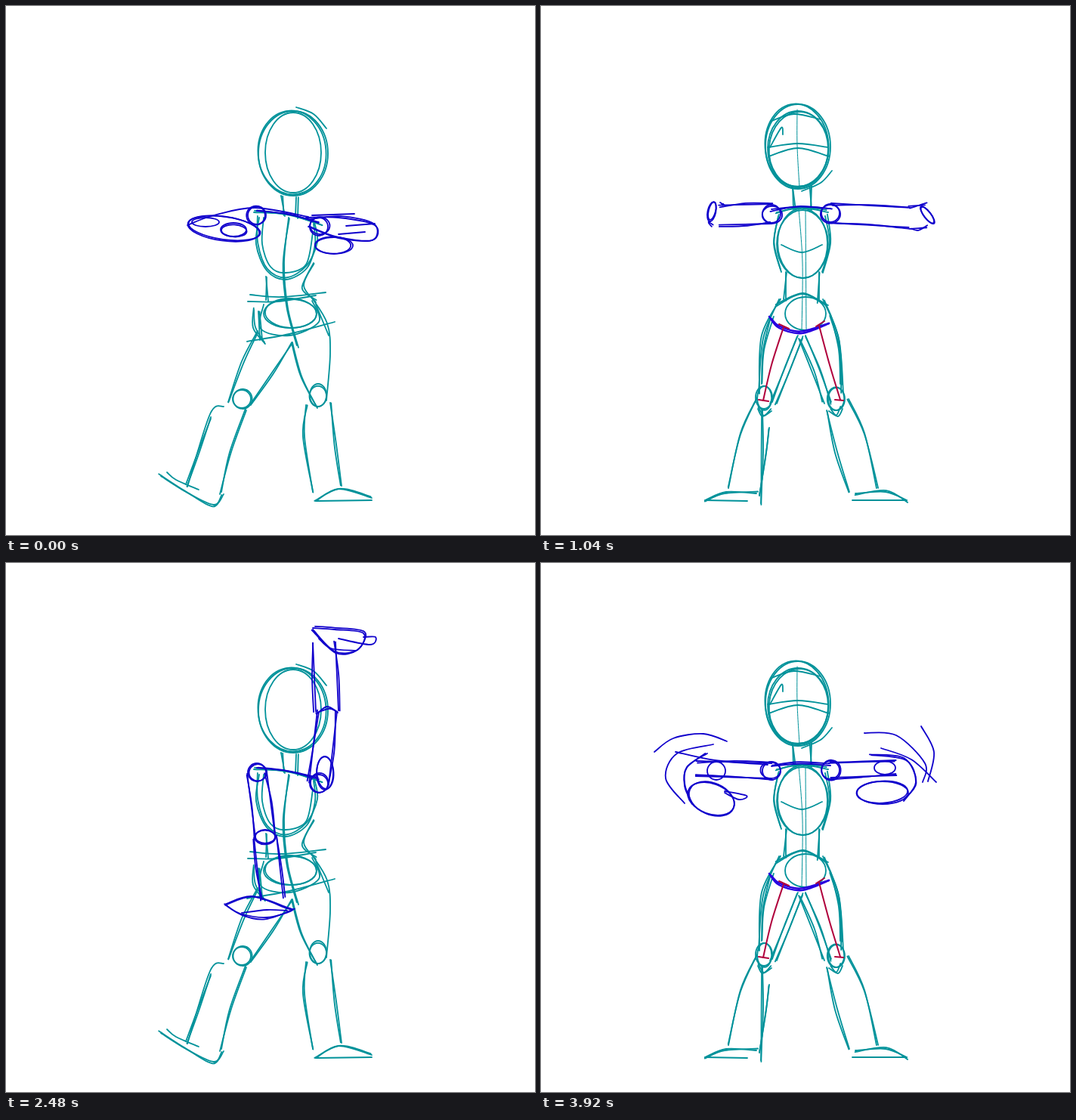
These frames come from a looping animation (700 by 700 pixels, 4 s). An HTML page with a canvas:

```html
<!DOCTYPE html>
<html lang="en">
<head>
<meta charset="utf-8">
<title>Dance sketch</title>
<style>
html, body { margin: 0; width: 100%; height: 100%; overflow: hidden; background: #fff; }
canvas { display: block; }
</style>
</head>
<body>
<canvas id="stage" width="700" height="700"></canvas>
<script>
const ctx = document.getElementById('stage').getContext('2d');
const TEAL = '#00929a', BLUE = '#1000cc', RED = '#b0003c';
const STEP = 80, COUNT = 50;

let seed = 1;
const shake = size => {
  seed = seed * 16807 % 2147483647;
  return (seed / 2147483647 - 0.5) * 2 * size;
};

function pen(color, width = 1.8) {
  ctx.strokeStyle = color;
  ctx.lineWidth = width;
}

// Smooth stroke through points x y x y ...
function line(...p) {
  const n = p.length / 2;
  const at = (i, d) => p[2 * Math.max(0, Math.min(n - 1, i)) + d];
  ctx.beginPath();
  ctx.moveTo(p[0], p[1]);
  for (let i = 0; i < n - 1; i++) {
    const c = [];
    for (const d of [0, 1]) {
      c[d] = at(i, d) + (at(i + 1, d) - at(i - 1, d)) / 6;
      c[d + 2] = at(i + 1, d) - (at(i + 2, d) - at(i, d)) / 6;
      c[d + 4] = at(i + 1, d);
    }
    ctx.bezierCurveTo(...c);
  }
  ctx.stroke();
}

// The same stroke gone over a second time by a loose hand
function loose(...p) {
  line(...p);
  line(...p.map(v => v + shake(3)));
}

function oval(x, y, rx, ry, turn = 0) {
  ctx.beginPath();
  ctx.ellipse(x, y, rx, ry, turn * Math.PI / 180, 0, 2 * Math.PI);
  ctx.stroke();
}

function ring(x, y, rx, ry = rx, turn = 0) {
  oval(x, y, rx, ry, turn);
  oval(x + shake(1.5), y + shake(1.5), rx + shake(1.5), ry + shake(1.5), turn + shake(4));
}

// A stroke and its mirror image; axis is twice the centre line
function both(axis, ...p) {
  loose(...p);
  loose(...p.map((v, i) => i % 2 ? v : axis - v));
}

function leanBody() {
  pen(TEAL);
  ring(380, 195, 46, 56);
  oval(380, 194, 37, 53);
  line(384, 134, 407, 143, 424, 162);
  loose(364, 251, 369, 278);
  loose(384, 253, 383, 278);
  loose(328, 273, 375, 276, 418, 290);
  loose(335, 280, 331, 315, 345, 350, 370, 362, 398, 347, 409, 315, 407, 288);
  line(341, 280, 339, 315, 350, 345, 370, 353, 397, 342, 406, 300);
  loose(374, 280, 368, 340, 373, 400, 387, 452);
  // pelvis
  loose(344, 358, 347, 391);
  loose(407, 340, 394, 370, 410, 392);
  line(323, 382, 365, 385, 423, 379);
  line(320, 391, 360, 391, 410, 383);
  ring(376, 407, 35, 19);
  line(341, 395, 337, 427, 375, 436, 414, 418, 405, 390);
  line(319, 444, 375, 434, 435, 418);
  loose(328, 402, 330, 425, 342, 445);
  loose(334, 404, 336, 442);
  // legs
  loose(333, 430, 312, 470, 294, 524);
  loose(379, 446, 352, 485, 324, 526);
  loose(378, 446, 390, 490, 412, 532);
  line(404, 385, 425, 420, 429, 460, 424, 522);
  line(410, 395, 427, 436);
  ring(312, 520, 12);
  ring(413, 515, 11, 15);
  line(288, 530, 270, 540, 240, 636);
  loose(271, 546, 254, 590, 238, 633);
  loose(318, 535, 298, 590, 283, 646);
  loose(397, 528, 395, 570, 406, 643);
  loose(429, 525, 437, 580, 444, 635);
  // feet
  loose(205, 622, 240, 644, 275, 660, 288, 646);
  line(213, 617, 225, 627, 255, 640);
  loose(410, 655, 440, 639, 484, 651);
  line(410, 655, 484, 654);
}

function squareBody() {
  pen(TEAL);
  ring(340, 186, 43, 56);
  ring(340, 189, 40, 50);
  line(300, 187, 340, 182, 380, 187);
  line(301, 199, 340, 188, 381, 199);
  line(303, 187, 318, 161, 320, 170);
  line(305, 152, 335, 143, 370, 150);
  line(385, 218, 370, 234, 345, 245);
  both(691, 333, 238, 334, 269);
  ring(346, 315, 34, 45);
  both(690, 314, 278, 308, 315, 318, 352);
  loose(312, 273, 345, 267, 380, 273);
  line(318, 316, 345, 326, 372, 316);
  both(692, 324, 352, 324, 390);
  loose(310, 398, 345, 381, 380, 396);
  oval(350, 407, 27, 22);
  // legs
  both(688, 315, 388, 294, 440, 288, 512);
  both(688, 305, 408, 294, 455, 292, 500);
  both(690, 340, 436, 322, 480, 306, 524);
  both(687, 346, 440, 328, 485, 312, 526);
  ring(295, 518, 11, 15);
  ring(391, 520, 11, 15);
  both(686, 287, 533, 293, 543, 305, 536);
  both(692, 285, 520, 264, 565, 248, 638);
  loose(293, 535, 294, 590, 291, 658);
  loose(302, 558, 298, 590, 289, 648);
  loose(378, 535, 392, 590, 408, 643);
  both(701, 217, 654, 245, 643, 285, 645);
  line(217, 654, 273, 655);
  line(412, 654, 484, 654);
  pen(TEAL, 1);
  line(339, 137, 339, 185, 342, 240);
  line(341, 268, 346, 340, 345, 430);
  line(350, 270, 351, 430);
  pen('#2800e0', 2.5);
  loose(302, 411, 315, 426, 345, 433, 381, 420);
  pen(RED, 2);
  line(321, 425, 305, 475, 294, 522);
  line(368, 423, 382, 475, 396, 521);
  line(315, 421, 328, 427);
  line(288, 521, 301, 523);
  line(364, 424, 375, 417);
  line(389, 521, 400, 522);
}

// Arms as elbow, wrist, fingertip (left, then right); tubes is how many limb segments
// the finished drawing shows, hands adds its own details.
const pose = (left, right, tubes, hands) => ({ joints: [...left, ...right], tubes, hands });

// Arms thrown out straight to the given fingertips
function straight(lx, ly, rx, ry) {
  const reach = (x, y, sx) => [0.42, 0.78, 1].flatMap(k => [sx + (x - sx) * k, 280 + (y - 280) * k]);
  return pose(reach(lx, ly, 308), reach(rx, ry, 396), 2);
}

const fold = pose([246, 290, 305, 297, 335, 303], [486, 300, 450, 314, 410, 318], 0, () => {
  ring(289, 294, 48, 15, 8);
  ring(301, 296, 17, 9);
  line(240, 290, 275, 277, 330, 267, 400, 279);
  oval(264, 286, 18, 6);
  loose(397, 280, 440, 280, 488, 290, 485, 310, 440, 307, 400, 292);
  line(405, 277, 461, 275);
  ring(434, 317, 25, 11);
  line(450, 291, 488, 288);
  line(440, 302, 475, 299);
});

const raise = pose([212, 266, 192, 187, 237, 132], [449, 238, 436, 147, 380, 106], 2, () => {
  loose(171, 187, 185, 157, 215, 131, 236, 130, 230, 147, 213, 166);
  line(213, 166, 238, 155);
  line(175, 187, 207, 184, 239, 162);
  line(220, 249, 211, 262, 209, 280);
  loose(383, 103, 405, 103, 430, 113, 448, 138, 458, 175);
  line(375, 113, 395, 127, 437, 140);
  loose(379, 145, 390, 137, 421, 148);
  line(421, 150, 430, 140, 445, 145, 452, 157);
});

const fling = pose([222, 304, 205, 330, 243, 345], [443, 254, 478, 278, 450, 298], 1, () => {
  line(215, 297, 229, 278, 226, 308, 215, 297);
  loose(198, 292, 193, 315, 205, 345, 238, 354, 249, 335, 230, 308);
  line(188, 290, 185, 318, 197, 342);
  line(178, 277, 141, 315, 155, 342, 220, 357);
  line(198, 288, 171, 313, 195, 345);
  oval(449, 254, 12, 12);
  loose(440, 240, 468, 243, 482, 272, 465, 301, 444, 286, 455, 250);
  line(484, 204, 490, 235, 480, 295);
  line(504, 212, 531, 238, 517, 273, 480, 295);
  line(500, 220, 512, 250, 487, 292);
  line(494, 222, 495, 250, 487, 275);
});

const leftUp = pose([308, 203, 325, 113, 350, 62], [411, 370, 388, 446, 375, 475], 2, () => {
  loose(312, 107, 328, 68, 347, 58, 367, 78, 366, 95);
  line(335, 90, 352, 97, 378, 94, 357, 113, 339, 118);
  line(310, 108, 322, 102, 335, 108, 340, 118);
  line(292, 205, 300, 201, 313, 202);
  loose(402, 363, 411, 362, 420, 377);
  loose(372, 440, 366, 465, 382, 478, 403, 455);
  line(382, 445, 395, 455, 408, 450, 415, 473, 405, 445);
  oval(384, 466, 8, 8);
});

const rightUp = pose([343, 362, 352, 445, 295, 453], [425, 196, 421, 105, 485, 100], 2, () => {
  ring(343, 362, 13, 9);
  loose(291, 451, 325, 441, 370, 455, 378, 460, 345, 469, 310, 464, 291, 453);
  line(312, 463, 345, 459, 372, 460);
  ring(422, 278, 11, 22);
  loose(411, 200, 425, 190, 439, 198);
  loose(406, 86, 435, 88, 473, 93, 465, 115, 435, 117, 406, 88);
  line(414, 100, 430, 113, 463, 116);
  line(473, 98, 489, 98, 482, 108, 440, 100);
});

const onHip = pose([269, 236, 256, 150, 315, 135], [455, 336, 425, 392, 420, 435], 2, () => {
  ring(269, 236, 13);
  ring(283, 139, 34, 11, -8);
  loose(238, 153, 247, 137, 280, 128, 321, 130);
  oval(448, 333, 9, 9);
  ring(417, 407, 16, 31, -15);
  line(462, 332, 440, 348, 408, 333);
  line(480, 292, 478, 310, 462, 335);
});

const swing = pose([205, 272, 202, 302, 252, 322], [470, 271, 485, 300, 420, 305], 1, () => {
  oval(232, 275, 12, 12);
  ring(225, 312, 32, 20, 20);
  line(243, 302, 272, 308, 262, 313, 243, 304);
  line(150, 250, 175, 232, 215, 226, 246, 236);
  line(228, 240, 180, 252, 165, 285, 190, 318);
  loose(220, 252, 193, 270, 190, 295, 200, 318);
  line(178, 250, 230, 261, 300, 267);
  oval(455, 271, 14, 9);
  ring(452, 304, 34, 15);
  line(428, 225, 470, 228, 508, 265, 505, 290);
  line(503, 216, 520, 250, 512, 289);
  loose(437, 254, 483, 261, 496, 290, 480, 315);
  line(450, 245, 490, 260, 523, 290);
});

const wide = straight(110, 240, 617, 232);
const spread = straight(90, 215, 567, 225);
const keys = [[0, fold], [3, straight(302, 48, 630, 245)], [8, raise], [11, wide], [15, fold], [16, fold],
  [19, fling], [21, straight(118, 215, 618, 200)], [24, leftUp], [27, straight(318, 44, 520, 150)],
  [31, rightUp], [34, straight(109, 255, 560, 250)], [42, onHip], [45, spread], [46, spread],
  [49, swing], [50, fold]];

// Stance per step: R leans right, L is its mirror, C is square.
const stance = 'RRRCC' + 'LLLLLLLL' + 'CCRR' + 'CLLLLCC' + 'RRCLLCRRR' + 'CLLLLCC' + 'RRRRR' + 'LLLCC';
const shoulders = { R: [332, 277, 414, 292], L: [285, 293, 375, 274], C: [305, 275, 383, 274] };

function drawBody(side) {
  seed = 77;
  if (side === 'C') return squareBody();
  ctx.save();
  if (side === 'L') ctx.transform(-1, 0, 0, 1, 704, -2);
  leanBody();
  ctx.restore();
}

// Two loose lines along each side of a limb
function tube(x1, y1, x2, y2, r) {
  const len = Math.hypot(x2 - x1, y2 - y1) || 1;
  const nx = (y1 - y2) / len * r, ny = (x2 - x1) / len * r;
  for (const s of [-1, 1]) {
    loose(x1 + nx * s, y1 + ny * s, (x1 + x2) / 2 + nx * s, (y1 + y2) / 2 + ny * s, x2 + nx * s, y2 + ny * s);
  }
}

function drawArm(sx, sy, [ex, ey, wx, wy, tx, ty], tubes, hand) {
  ring(sx, sy, 12);
  if (tubes > 0) tube(sx, sy, ex, ey, tubes > 1 ? 13 : 10);
  if (tubes > 1) tube(ex, ey, wx, wy, 15);
  if (!hand) return;
  const turn = Math.atan2(ty - wy, tx - wx) * 180 / Math.PI;
  ring((wx + tx) / 2, (wy + ty) / 2, Math.hypot(tx - wx, ty - wy) / 2 + 2, 13, turn);
}

function drawArms(step) {
  const next = keys.findIndex(k => k[0] > step);
  const [t0, from] = keys[next - 1], [t1, to] = keys[next];
  const k = (step - t0) / (t1 - t0);
  const joints = from.joints.map((v, i) => v + (to.joints[i] - v) * k);
  const drawn = k === 0 && from.hands;
  const tubes = drawn ? from.tubes : 2;
  const [lx, ly, rx, ry] = shoulders[stance[step]];
  seed = 1000 + step * 7919;
  pen(BLUE);
  drawArm(lx, ly, joints.slice(0, 6), tubes, !drawn);
  drawArm(rx, ry, joints.slice(6), tubes, !drawn);
  loose(lx, ly - 6, (lx + rx) / 2, (ly + ry) / 2 - 9, rx, ry - 6);
  if (drawn) from.hands();
}

let shown = -1;
const start = performance.now();
ctx.lineCap = ctx.lineJoin = 'round';

function tick() {
  const step = Math.floor((performance.now() - start) / STEP) % COUNT;
  if (step !== shown) {
    shown = step;
    ctx.fillStyle = '#fff';
    ctx.fillRect(0, 0, 700, 700);
    drawBody(stance[step]);
    drawArms(step);
  }
  requestAnimationFrame(tick);
}
tick();
</script>
</body>
</html>
```
